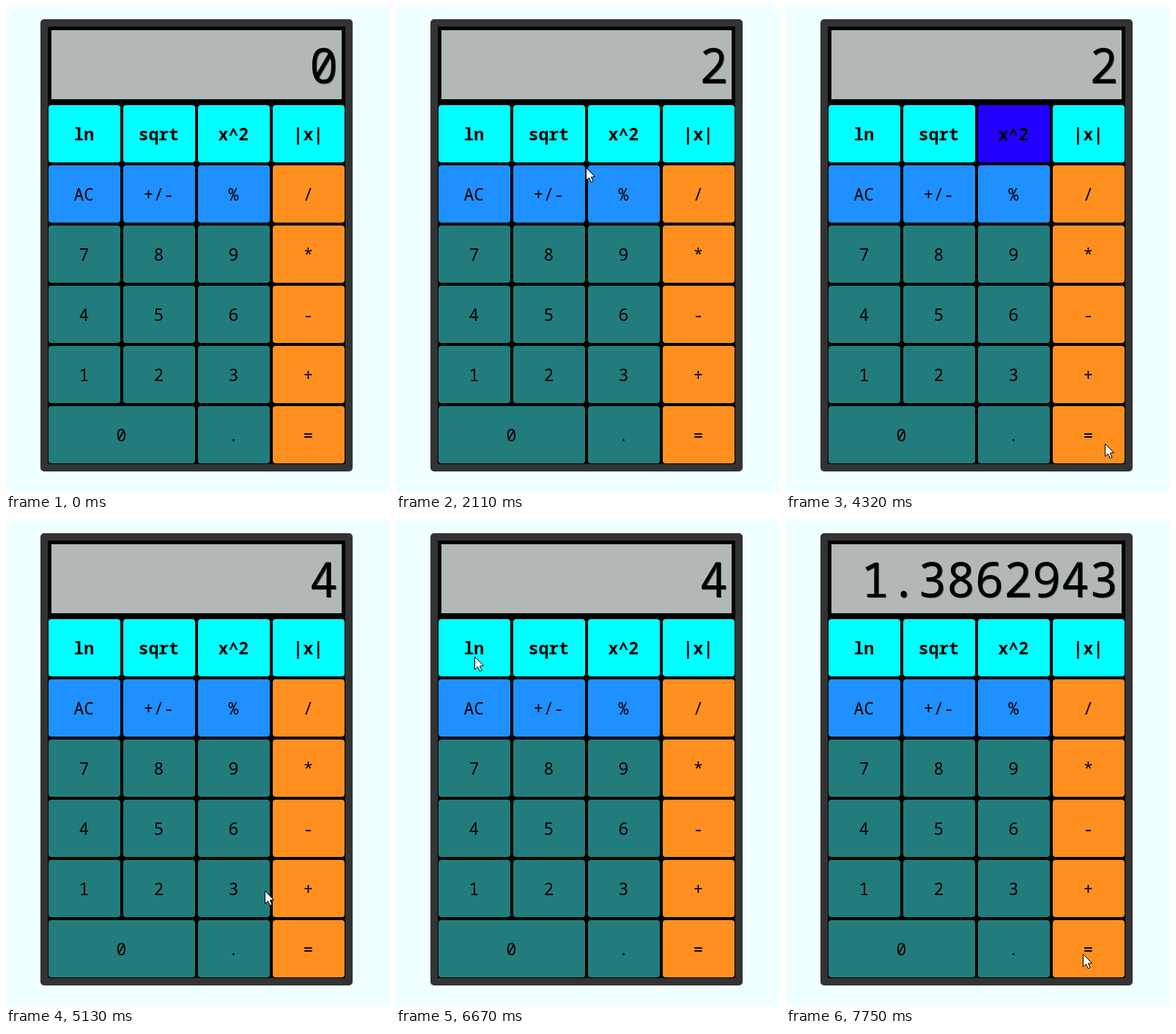
An HTML page with a canvas for the animation above (8000 ms loop, 524 px wide and 662 px high).

```html
<!DOCTYPE html>
<html lang="en">
<head>
<meta charset="utf-8">
<title>Calculator</title>
<style>
  html, body { margin: 0; width: 100%; height: 100%; overflow: hidden; background: #f0ffff; }
  canvas { display: block; }
</style>
</head>
<body>
<canvas id="stage" width="524" height="662"></canvas>
<script>
const ctx = document.getElementById('stage').getContext('2d');
const LOOP = 8000;
const FONT = '"Noto Sans Mono", "DejaVu Sans Mono", monospace';
const CYAN = '#00ffff', BLUE = '#1e90ff', TEAL = '#227c7c', ORANGE = '#ff8f1f', ARMED = '#2200ff';
const DARK = { [BLUE]: '#1873cc', [TEAL]: '#1b6363', [ORANGE]: '#cc7219' };

const rows = [
  ['ln', 'sqrt', 'x^2', '|x|'],
  ['AC', '+/-', '%', '/'],
  ['7', '8', '9', '*'],
  ['4', '5', '6', '-'],
  ['1', '2', '3', '+'],
  ['0', '', '.', '=']
];

const keys = [];
rows.forEach((row, r) => row.forEach((label, c) => {
  if (!label) return;
  const color = r === 0 ? CYAN : c === 3 ? ORANGE : r === 1 ? BLUE : TEAL;
  keys.push({ label, color, x: 58 + 102 * c, y: 135 + 82 * r, w: label === '0' ? 200 : 98, bold: r === 0 });
}));

// label, from, to
const presses = [
  ['2', 1620, 1695], ['x^2', 3645, 4385], ['=', 4385, 4455], ['AC', 5590, 5655],
  ['4', 6328, 6395], ['ln', 7145, 7615], ['=', 7615, 7685]
];

// time, value shown from then on
const values = [[0, '0'], [1695, '2'], [4455, '4'], [5655, '0'], [6395, '4'], [7685, '1.3862943']];

// start, end and step count of each pointer move
const moves = [
  [140, 890, 11], [1090, 1230, 3], [1500, 1700, 4], [1900, 2660, 12], [2730, 2860, 2],
  [3650, 4390, 12], [4460, 4720, 4], [4920, 5660, 11], [5730, 6190, 8], [6330, 7070, 12], [7150, 7750, 10]
];

// time, x, y of the pointer tip
const path = [
  [140, 417, 575], [540, 215, 275], [600, 190, 261], [820, 129, 345], [890, 138, 362],
  [1090, 137, 380], [1230, 125, 486],
  [1500, 140, 490], [1700, 209, 521],
  [1900, 212, 500], [2107, 259, 220], [2660, 287, 176], [2860, 297, 174],
  [3650, 299, 180], [4200, 425, 575], [4310, 435, 596], [4720, 435, 595],
  [4920, 430, 590], [5480, 140, 270], [5560, 121, 262], [5660, 121, 262],
  [5730, 135, 320], [5861, 180, 448], [6190, 130, 430],
  [6400, 130, 430], [6540, 120, 300], [6666, 107, 186], [7070, 107, 186],
  [7150, 108, 190], [7220, 120, 205], [7560, 400, 585], [7620, 405, 591]
];

const lastBefore = (list, t) => list.filter(item => item[0] <= t).pop();

function pointerAt(t) {
  const move = lastBefore(moves, t);
  if (!move) return null;
  const [start, end, count] = move;
  const gap = (end - start) / (count - 1);
  const q = Math.min(end, start + Math.floor((t - start) / gap + 0.1) * gap);
  const i = path.findIndex(p => p[0] > q);
  if (i < 0) return path[path.length - 1].slice(1);
  const a = path[i - 1], b = path[i];
  const u = (q - a[0]) / (b[0] - a[0]);
  return [1, 2].map(k => Math.round(a[k] + (b[k] - a[k]) * u));
}

function box(x, y, w, h, r, color) {
  ctx.fillStyle = color;
  ctx.beginPath();
  ctx.roundRect(x, y, w, h, r);
  ctx.fill();
}

function drawKey(key, t) {
  const down = presses.some(([label, from, to]) => label === key.label && t >= from && t < to);
  const color = !down ? key.color : key.bold ? ARMED : DARK[key.color];
  box(key.x, key.y, key.w, 78, 4, color);
  ctx.font = `${key.bold ? 'bold ' : ''}23px ${FONT}`;
  ctx.textAlign = 'center';
  ctx.fillStyle = '#000';
  ctx.fillText(key.label, key.x + key.w / 2 - 0.7, key.y + 48);
}

function drawDisplay(text) {
  box(62, 33, 396, 94, 0, '#b1b8b6');
  ctx.font = `65px ${FONT}`;
  ctx.textAlign = 'right';
  ctx.fillStyle = '#2f4f4f';
  ctx.fillText(text, 454, 106);
  ctx.fillStyle = '#000';
  ctx.fillText(text, 453, 105);
}

function drawPointer([x, y]) {
  const shape = [[0, 0], [0, 17], [4, 13.5], [6.8, 19.5], [9.5, 18.2], [6.8, 12.5], [12, 12]];
  ctx.beginPath();
  shape.forEach(([dx, dy]) => ctx.lineTo(x + 0.5 + dx, y + 0.5 + dy));
  ctx.closePath();
  ctx.fillStyle = '#fff';
  ctx.fill();
  ctx.lineWidth = 1;
  ctx.strokeStyle = '#000';
  ctx.stroke();
}

function draw(t) {
  ctx.fillStyle = '#f0ffff';
  ctx.fillRect(0, 0, 524, 662);
  box(47, 18, 426, 616, 5, '#333');
  box(57, 28, 406, 596, 0, '#000');
  drawDisplay(lastBefore(values, t)[1]);
  keys.forEach(key => drawKey(key, t));
  const tip = pointerAt(t);
  if (tip) drawPointer(tip);
}

const begin = performance.now();
function tick() {
  draw(Math.max(0, performance.now() - begin) % LOOP);
  requestAnimationFrame(tick);
}
tick();
</script>
</body>
</html>
```
